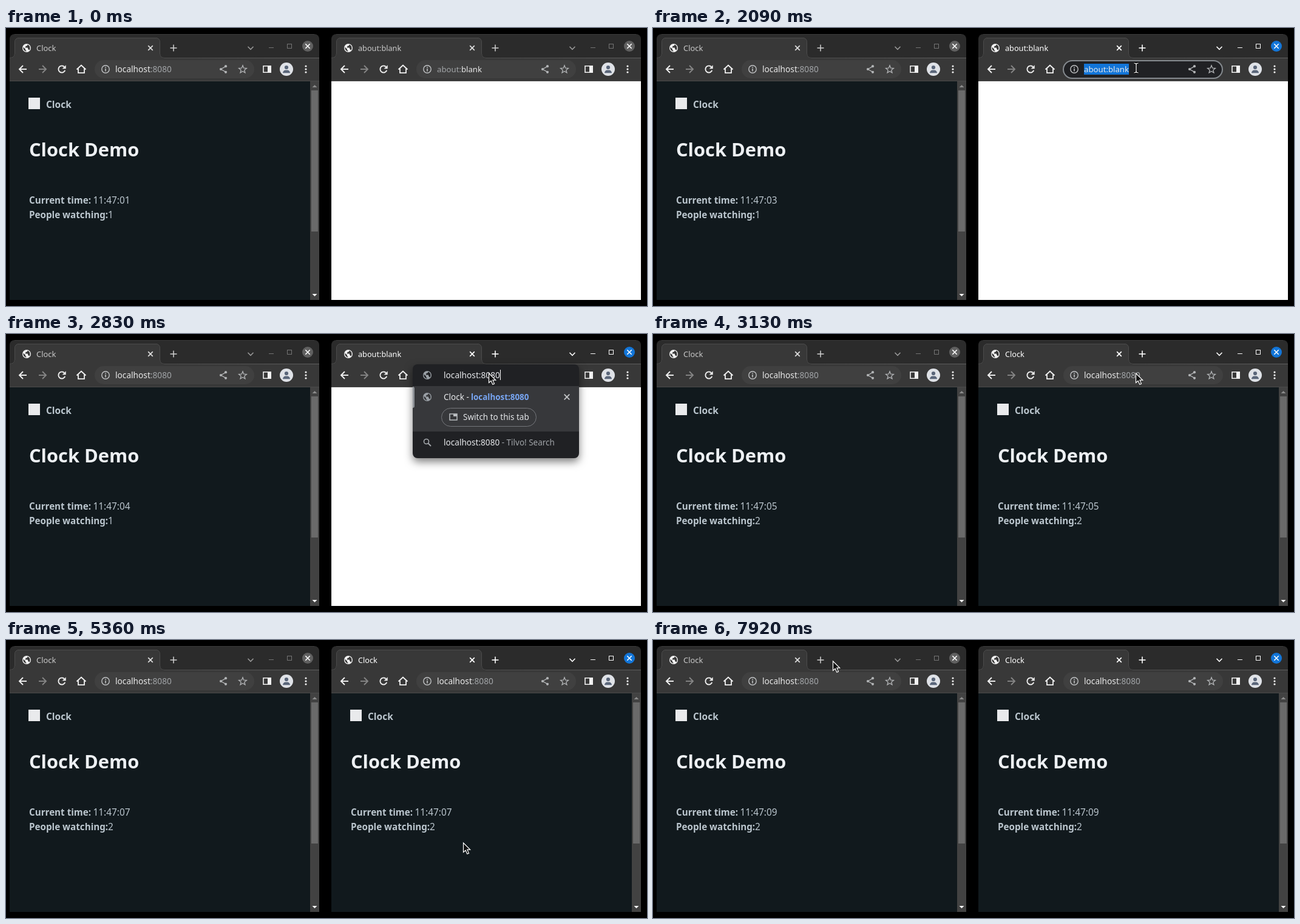
An HTML page with a canvas for the animation above (8000 ms loop, 1056 by 459 pixels).

```html
<!DOCTYPE html>
<html lang="en">
<head>
<meta charset="utf-8">
<title>Clock demo</title>
<style>
html, body { margin: 0; width: 100%; height: 100%; overflow: hidden; background: #000; }
canvas { display: block; }
</style>
</head>
<body>
<canvas id="stage" width="1056" height="459"></canvas>
<script>
const g = document.getElementById('stage').getContext('2d');
const LOOP = 8000;
const FONT = '"Noto Sans", "Open Sans", sans-serif';
const URL_TEXT = 'localhost:8080';
const WHITE = '#f1f1f1', GREY = '#a2a5a8', BLUE = '#1275d8', DARK = '#202124';

const ticks = [390, 1430, 2410, 3130, 4370, 5360, 6360, 7350];
const FOCUS = 860, SELECT = 2090, TYPE = 2260, LOAD = 3130;
const typing = [[2260, 1], [2410, 2], [2490, 3], [2830, 14]];

// ---- helpers ----
function setFont(size, bold) {
  g.font = (bold ? 'bold ' : '') + size + 'px ' + FONT;
}

function text(str, x, y, size, color, bold) {
  setFont(size, bold);
  g.fillStyle = color;
  g.fillText(str, x, y);
  return x + g.measureText(str).width;
}

function rect(x, y, w, h, color) {
  g.fillStyle = color;
  g.fillRect(x, y, w, h);
}

function round(x, y, w, h, r, fill, stroke, width = 1) {
  g.beginPath();
  g.roundRect(x, y, w, h, r);
  if (fill) { g.fillStyle = fill; g.fill(); }
  if (stroke) { g.strokeStyle = stroke; g.lineWidth = width; g.stroke(); }
}

function disc(x, y, r, color) {
  g.beginPath();
  g.arc(x, y, r, 0, Math.PI * 2);
  g.fillStyle = color;
  g.fill();
}

function ring(x, y, r, color, width) {
  g.beginPath();
  g.arc(x, y, r, 0, Math.PI * 2);
  g.strokeStyle = color;
  g.lineWidth = width;
  g.stroke();
}

// Coordinates are offsets from (x, y), two per point.
function trace(x, y, pts, close) {
  g.beginPath();
  for (let i = 0; i < pts.length; i += 2) g.lineTo(x + pts[i], y + pts[i + 1]);
  if (close) g.closePath();
}

function line(x, y, pts, color, width, close) {
  trace(x, y, pts, close);
  g.strokeStyle = color;
  g.lineWidth = width;
  g.stroke();
}

function poly(x, y, pts, color) {
  trace(x, y, pts, true);
  g.fillStyle = color;
  g.fill();
}

// ---- icons ----
function cross(x, y, r, color, width = 1.6) {
  line(x, y, [-r, -r, r, r], color, width);
  line(x, y, [-r, r, r, -r], color, width);
}

function plus(x, y, color) {
  line(x, y, [-5.5, 0, 5.5, 0], color, 1.6);
  line(x, y, [0, -5.5, 0, 5.5], color, 1.6);
}

function globe(x, y, color, back) {
  disc(x, y, 7, color);
  poly(x, y, [-5.7, -1.5, -2, 1.8, -2, 3.2, -.6, 4.4, -.6, 5.8, -3.4, 4.6, -5.4, 2], back);
  poly(x, y, [1.2, -5.6, 1, -3.8, -1.8, -3, -1.8, -1, -3.2, -.6, 1.8, -.4, 2.4, 1.8, 4.2, 3.8, 5.6, 1.4, 5.2, -2.4, 3.4, -4.8], back);
}

function arrow(x, dir, color) {
  line(x, 68, [-6 * dir, 0, 6 * dir, 0], color, 1.9);
  line(x, 68, [0, -6, 6 * dir, 0, 0, 6], color, 1.9);
}

function reload(x, color) {
  g.beginPath();
  g.arc(x, 68, 5.6, .35, Math.PI * 1.75);
  g.strokeStyle = color;
  g.lineWidth = 1.9;
  g.stroke();
  poly(x, 68, [6.7, -6.8, 6.7, -.8, .7, -.8], color);
}

function home(x, color) {
  line(x, 68, [-7.5, .5, 0, -6.5, 7.5, .5], color, 1.8);
  line(x, 68, [-5, -1, -5, 6.2, 5, 6.2, 5, -1], color, 1.8);
}

function info(x, color) {
  ring(x, 68, 6.2, color, 1.4);
  rect(x - .8, 67, 1.6, 4.5, color);
  rect(x - .8, 64.2, 1.6, 1.6, color);
}

function share(x, color) {
  line(x, 68, [4, -4.6, -4, 0, 4, 4.6], color, 1.3);
  disc(x - 4, 68, 2.1, color);
  disc(x + 4, 63.2, 2.1, color);
  disc(x + 4, 72.8, 2.1, color);
}

function star(x, color) {
  const pts = [];
  for (let i = 0; i < 10; i++) {
    const a = (i / 5 - .5) * Math.PI, r = i % 2 ? 2.9 : 6.7;
    pts.push(r * Math.cos(a), r * Math.sin(a) + .5);
  }
  line(x, 68, pts, color, 1.3, true);
}

function person(x) {
  disc(x, 68, 11, '#dfe2e7');
  disc(x, 65, 3.1, '#596579');
  round(x - 6, 69.6, 12, 4.6, [5, 5, 0, 0], '#596579');
}

// ---- browser window ----
function frame(x, active) {
  const lit = active ? '#fff' : '#c9c9c9';
  const dim = active ? '#fff' : '#747474';
  round(x, 10, 510, 439, [8, 8, 0, 0], '#2b2b2b');
  line(x, 10, [8, .5, 502, .5], '#3b3b3b', 1);
  rect(x, 50, 510, 38, '#383838');

  g.beginPath();
  g.moveTo(x, 49.5);
  g.quadraticCurveTo(x + 8.5, 49.5, x + 8.5, 42);
  g.lineTo(x + 8.5, 24);
  g.quadraticCurveTo(x + 8.5, 16.5, x + 16, 16.5);
  g.lineTo(x + 240, 16.5);
  g.quadraticCurveTo(x + 247.5, 16.5, x + 247.5, 24);
  g.lineTo(x + 247.5, 42);
  g.quadraticCurveTo(x + 247.5, 49.5, x + 255, 49.5);
  g.lineTo(x + 510, 49.5);
  g.strokeStyle = '#606060';
  g.lineWidth = 1;
  g.stroke();
  g.lineTo(x + 255, 50);
  g.lineTo(x, 50);
  g.fillStyle = '#383838';
  g.fill();

  globe(x + 28, 33, '#f2f2f2', '#383838');
  cross(x + 232, 33, 3.8, active ? '#fff' : '#dedede', 1.7);
  plus(x + 270, 33, lit);
  line(x + 397, 33, [-4.5, -2.2, 0, 2.3, 4.5, -2.2], active ? '#fff' : '#999', 1.6);
  rect(x + 427, 32, 8, 1, dim);
  g.strokeStyle = dim;
  g.lineWidth = 1;
  g.strokeRect(x + 457.5, 26.5, 7, 7);
  disc(x + 491, 30, 9, active ? BLUE : '#606060');
  cross(x + 491, 30, 3.7, '#fff', 1.6);

  arrow(x + 22, -1, WHITE);
  arrow(x + 54, 1, '#858585');
  reload(x + 86, WHITE);
  home(x + 118, WHITE);
  line(x + 424, 68, [-6, -5.2, 6, -5.2, 6, 5.2, -6, 5.2], WHITE, 1.6, true);
  rect(x + 425, 62, 6, 12, WHITE);
  person(x + 456);
  for (const d of [-5, 0, 5]) disc(x + 488, 68 + d, 1.6, WHITE);
  rect(x, 87, 510, 1, '#4a4a4a');
}

function addressBar(x, focused) {
  if (focused) round(x + 670 - 530 - 6 + 6, 54, 262, 29, 14.5, DARK, '#858a8f', 2);
  else round(x + 140, 53, 263, 30, 15, '#404040');
  info(x + 158, '#c0c2c4');
  share(x + 352, '#b2b4b6');
  star(x + 384, '#b2b4b6');
}

function localAddress(x) {
  const end = text('localhost', x + 174, 73, 13.7, '#e9e9e9');
  text(':8080', end, 73, 13.7, GREY);
}

function page(x, sec, people) {
  const soft = '#bbc6ce';
  rect(x, 88, 510, 361, '#11191d');
  rect(x + 31, 115, 19, 19, '#e9eaec');
  text('Clock', x + 60, 132, 15.5, soft, true);
  text('Clock Demo', x + 32, 212, 30.8, '#edf0f3', true);
  text('Current time:', x + 32, 290, 15.2, soft, true);
  text('11:47:0' + sec, x + 137.5, 290, 15.4, soft);
  text('People watching:', x + 32, 314, 15.2, soft, true);
  text(people, x + 162, 314, 15.4, soft);
  rect(x + 495, 88, 15, 361, '#424242');
  rect(x + 497, 103, 11, 233, '#6a6a6a');
  poly(x + 502.5, 96, [-4, 2, 0, -2, 4, 2], '#8b8b8b');
  poly(x + 502.5, 441, [-4, -2, 0, 2, 4, -2], '#fff');
}

// ---- suggestion list ----
function suggestions(count) {
  const typed = URL_TEXT.slice(0, count), rest = URL_TEXT.slice(count);
  const first = count === 1, full = !rest;
  const bottom = first ? 277 : 205;
  g.save();
  g.shadowColor = 'rgba(0,0,0,.5)';
  g.shadowBlur = 14;
  g.shadowOffsetY = 6;
  round(670, 50, 274, bottom - 50, 8, DARK);
  g.restore();

  globe(694, 68, '#9aa0a6', DARK);
  setFont(13.7);
  const cut = 721 + g.measureText(typed).width;
  const end = 721 + g.measureText(URL_TEXT).width;
  if (!full) rect(cut, 59, end - cut, 18, BLUE);
  text(URL_TEXT, 721, 73, 13.7, '#e8eaed');
  if (full) rect(Math.round(end), 59, 1, 17, '#fff');

  rect(670, 86, 274, 75, '#37383b');
  round(670, 87, 3, 35, [0, 3, 3, 0], '#8f9398');
  globe(694, 104, '#9aa0a6', '#37383b');
  text('Clock - ', 721, 109, 13.5, '#e8eaed');
  const mid = text(typed, 766, 109, 13.4, '#78a6f3', true);
  text(rest, mid, 109, 13.6, '#78a6f3');
  cross(924, 104, 4.3, '#c6c8ca', 1.7);

  round(717.5, 122.5, 156, 30, 15, null, '#75777b');
  line(737, 137, [-6, -5, 6, -5, 6, 5, -6, 5], '#b9bcc0', 1.5, true);
  rect(737, 132, 6, 4, '#b9bcc0');
  text('Switch to this tab', 753, 142, 13.5, '#e3e5e8');

  ring(692.5, 177.5, 4, '#a5a9ad', 1.6);
  line(695.5, 180.5, [0, 0, 4.5, 4.5], '#a5a9ad', 1.8);
  const after = text(typed, 721, 184, 13.6, '#e8eaed', first);
  text(' - Tilvo! Search', after, 184, 13.5, '#a0a4a8');

  if (!first) return;
  for (const y of [215, 251]) {
    disc(694, y, 8, '#69b53f');
    let x = text('Start Page - ', 721, y + 5, 13.35, '#e8eaed');
    x = text('L', x, y + 5, 13.35, '#e8eaed', true);
    text('inux Mint', x, y + 5, 13.35, '#e8eaed');
  }
}

// ---- pointer ----
const mix = (a, b, u) => a + (b - a) * u;
const bezier = (a, b, c, d, u) => {
  const v = 1 - u;
  return v * v * v * a + 3 * v * v * u * b + 3 * v * u * u * c + u * u * u * d;
};

const step = (t, start, gap, last) => Math.min(last, Math.floor((t - start) / gap + .02));

function pointer(t) {
  if (t < 310) return null;
  if (t < 4140) {
    const u = 1 - (1 - step(t, 310, 77.5, 4) / 4) ** 1.6;
    return [mix(903, 795.5, u), mix(262, 65, u)];
  }
  if (t < 7350) {
    const u = (step(t, 4140, 78, 5) + 1) / 6;
    const e = u * u * (3 - 2 * u);
    return [mix(795.5, 753.5, e), mix(65, 335, e)];
  }
  const u = (step(t, 7350, 81.4, 7) + 1) / 8;
  return [bezier(753.5, 520, -122, 296.5, u), bezier(335, 480, 420, 35, u)];
}

function drawPointer(t) {
  const p = pointer(t);
  if (!p) return;
  const [x, y] = p;
  if (t >= 620 && t < 2330) {
    const beam = (color, w) => {
      line(796, 66, [0, -7.5, 0, 7.5], color, w);
      line(796, 66, [-3.5, -8, 0, -7, 3.5, -8], color, w);
      line(796, 66, [-3.5, 8, 0, 7, 3.5, 8], color, w);
    };
    beam('#000', 3);
    beam('#fff', 1.3);
    return;
  }
  const shape = [0, 0, 0, 15.5, 3.6, 12.2, 6.3, 18.3, 9, 17.1, 6.4, 11.2, 11.2, 11.2];
  poly(x, y, shape, '#111');
  line(x, y, shape, '#fff', 1.2, true);
}

// ---- scene ----
function draw(t) {
  const sec = 1 + ticks.filter(k => t >= k).length;
  const active = t >= FOCUS, loaded = t >= LOAD;
  rect(0, 0, 1056, 459, '#000');

  frame(6, false);
  text('Clock', 50, 38, 12.9, '#c9c9c9');
  addressBar(6, false);
  localAddress(6);
  page(6, sec, loaded ? '2' : '1');

  frame(536, active);
  text(loaded ? 'Clock' : 'about:blank', 580, 38, 12.7, active ? '#fff' : '#c9c9c9');
  addressBar(536, active && !loaded);
  if (loaded) {
    localAddress(536);
    page(536, sec, '2');
  } else {
    rect(536, 88, 510, 361, '#fff');
    const chosen = t >= SELECT;
    if (chosen) rect(710, 59, 74, 18, BLUE);
    const end = text('about:', 710, 73, 13.2, active ? '#e9e9e9' : GREY);
    text('blank', end, 73, 13.2, '#e9e9e9');
    const blink = Math.floor((t - FOCUS) / 500) % 2 === 0;
    if (active && !chosen && blink) rect(784, 59, 1, 17, '#fff');
    if (t >= TYPE) suggestions(typing.filter(k => t >= k[0]).pop()[1]);
  }
  drawPointer(t);
}

const begin = performance.now();
function loop() {
  draw((performance.now() - begin) % LOOP);
  requestAnimationFrame(loop);
}
loop();
</script>
</body>
</html>
```
